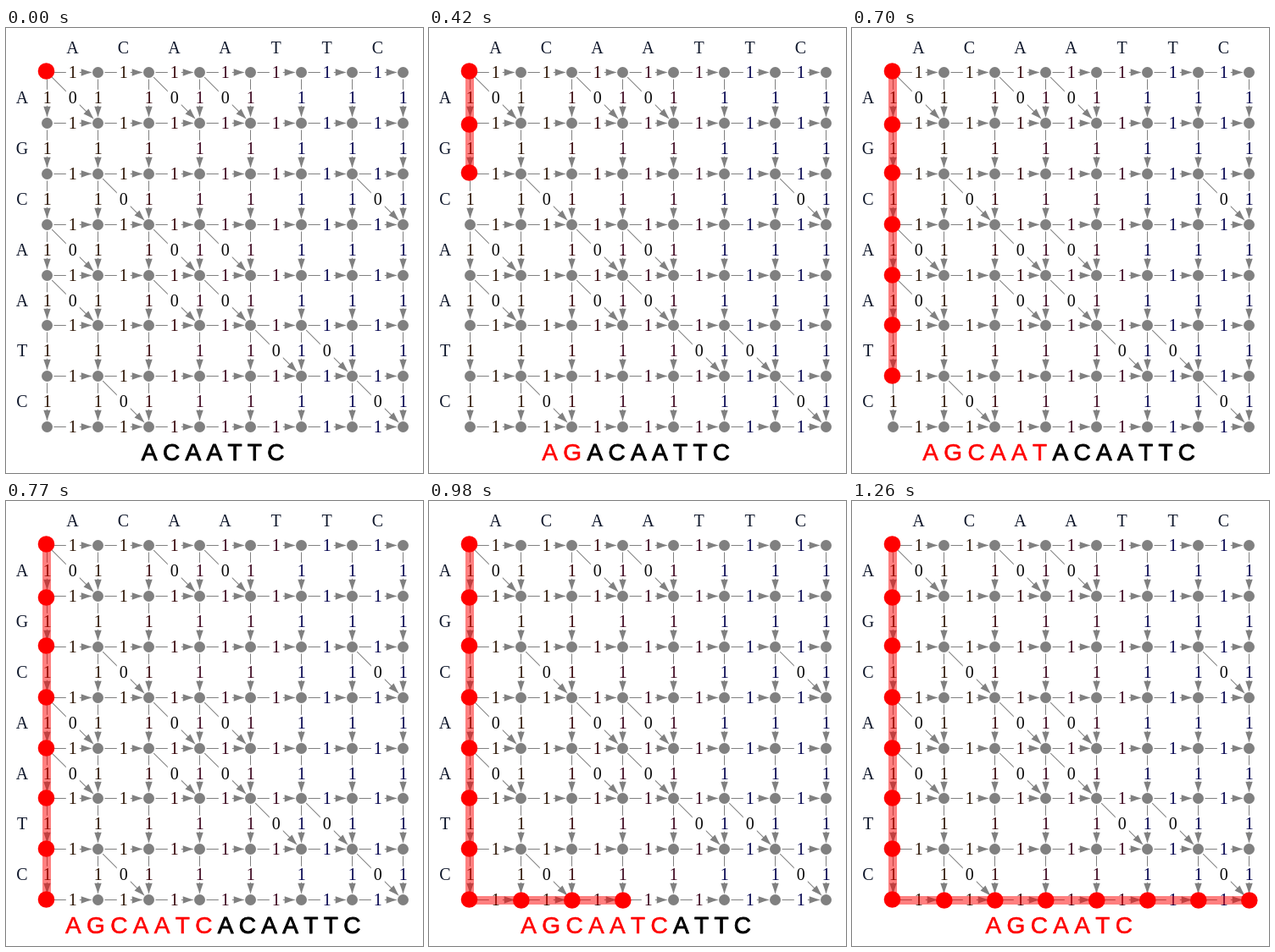
Write an HTML page with a canvas that moves like this. It is 492 px wide and 526 px high and loops after 1.61 s.

```html
<!DOCTYPE html>
<html lang="en">
<head>
<meta charset="utf-8">
<title>Edit graph path</title>
<style>
html, body { margin: 0; width: 100%; height: 100%; overflow: hidden; background: #fff; }
canvas { display: block; }
</style>
</head>
<body>
<canvas id="stage" width="492" height="526"></canvas>
<script>
const canvas = document.getElementById('stage');
const ctx = canvas.getContext('2d');
const across = 'ACAATTC';
const down = 'AGCAATC';
const N = 7;
const LOOP = 1610, HOLD = 280, STEP = 70;
const GRAY = '#808080';

const colX = i => Math.floor(48.9 + 59.9 * i) + 0.5;
const rowY = j => Math.floor(52.6 + 59.87 * j) + 0.5;

function disc(c, x, y, r, color) {
  c.fillStyle = color;
  c.beginPath();
  c.arc(x, y, r, 0, Math.PI * 2);
  c.fill();
}

function serif(c, text, x, y, color) {
  c.font = '20px "Liberation Serif", "Noto Serif", serif';
  c.textAlign = 'center';
  c.fillStyle = color;
  c.fillText(text, x, y + 6.5);
}

// Labels shift in tint from left to right.
function tint(x) {
  if (x < 140) return '#2a1200';
  if (x < 215) return '#330006';
  return x < 330 ? '#38001a' : '#00004d';
}

function edge(c, x0, y0, x1, y1, label) {
  const len = Math.hypot(x1 - x0, y1 - y0);
  const tip = len - 6.8, back = tip - 13;
  c.save();
  c.translate(x0, y0);
  c.rotate(Math.atan2(y1 - y0, x1 - x0));
  c.strokeStyle = c.fillStyle = GRAY;
  c.lineWidth = 1;
  c.beginPath();
  c.moveTo(8, 0);
  c.lineTo(back + 2, 0);
  c.stroke();
  c.beginPath();
  c.moveTo(tip, 0);
  c.quadraticCurveTo(tip - 6, -1.6, back, -4.2);
  c.lineTo(back, 4.2);
  c.quadraticCurveTo(tip - 6, 1.6, tip, 0);
  c.fill();
  c.restore();
  const mx = (x0 + x1) / 2 + 0.3, my = (y0 + y1) / 2 + 0.3;
  c.fillStyle = '#fff';
  c.fillRect(mx - 8, my - 10, 16, 19);
  serif(c, label, mx, my, label === '0' ? '#0a0a0a' : tint(mx));
}

function buildGraph() {
  const layer = document.createElement('canvas');
  layer.width = canvas.width;
  layer.height = canvas.height;
  const c = layer.getContext('2d');
  c.fillStyle = '#fff';
  c.fillRect(0, 0, layer.width, layer.height);
  for (let j = 0; j <= N; j++) {
    for (let i = 0; i <= N; i++) {
      const x = colX(i), y = rowY(j);
      if (i < N) edge(c, x, y, colX(i + 1), y, '1');
      if (j < N) edge(c, x, y, x, rowY(j + 1), '1');
      if (i < N && j < N && across[i] === down[j]) {
        edge(c, x, y, colX(i + 1), rowY(j + 1), '0');
      }
    }
  }
  for (let j = 0; j <= N; j++) {
    for (let i = 0; i <= N; i++) disc(c, colX(i), rowY(j), 6.5, GRAY);
  }
  for (let k = 0; k < N; k++) {
    serif(c, across[k], colX(k) + 30, 23.5, '#10182c');
    serif(c, down[k], 19, rowY(k) + 30.3, '#10182c');
  }
  return layer;
}

const graph = buildGraph();
const dotY = [51, 114, 171, 232, 292, 351, 411, 471];

function dotAt(k) {
  return k <= N ? [47.5, dotY[k]] : [48.8 + 60 * (k - N), 472];
}

function drawPath(n) {
  const low = Math.min(n, N);
  ctx.fillStyle = 'rgba(255, 0, 0, 0.5)';
  if (n > 0) ctx.fillRect(43, 51, 10, dotY[low] - 51);
  if (n > N) ctx.fillRect(53, 467, dotAt(n)[0] - 53, 10);
  for (let k = 0; k <= n; k++) disc(ctx, ...dotAt(k), 9.8, '#f00');
}

function drawWord(n) {
  const head = down.slice(0, n);
  const word = head + across.slice(Math.max(0, n - N));
  const gap = 6.33;
  ctx.font = '28px "Liberation Sans", Arial, sans-serif';
  ctx.textAlign = 'left';
  ctx.lineJoin = 'round';
  const widths = [...word].map(ch => ctx.measureText(ch).width);
  const total = widths.reduce((a, b) => a + b, 0) + gap * (word.length - 1);
  let x = 244.2 - total / 2;
  [...word].forEach((ch, k) => {
    const red = k < head.length;
    ctx.fillStyle = ctx.strokeStyle = red ? '#f00' : '#000';
    ctx.lineWidth = red ? 0.6 : 0.9;
    ctx.fillText(ch, x, 511);
    ctx.strokeText(ch, x, 511);
    x += widths[k] + gap;
  });
}

function draw(t) {
  // The first edge lights up one beat before its letter joins the word.
  const beat = Math.min(2 * N, Math.floor((t - HOLD + 0.01) / STEP));
  const edges = beat < 0 ? 0 : Math.max(1, beat);
  ctx.drawImage(graph, 0, 0);
  drawPath(edges);
  drawWord(Math.max(0, beat));
}

const start = performance.now();
function tick() {
  draw((performance.now() - start) % LOOP);
  requestAnimationFrame(tick);
}
tick();
</script>
</body>
</html>
```
